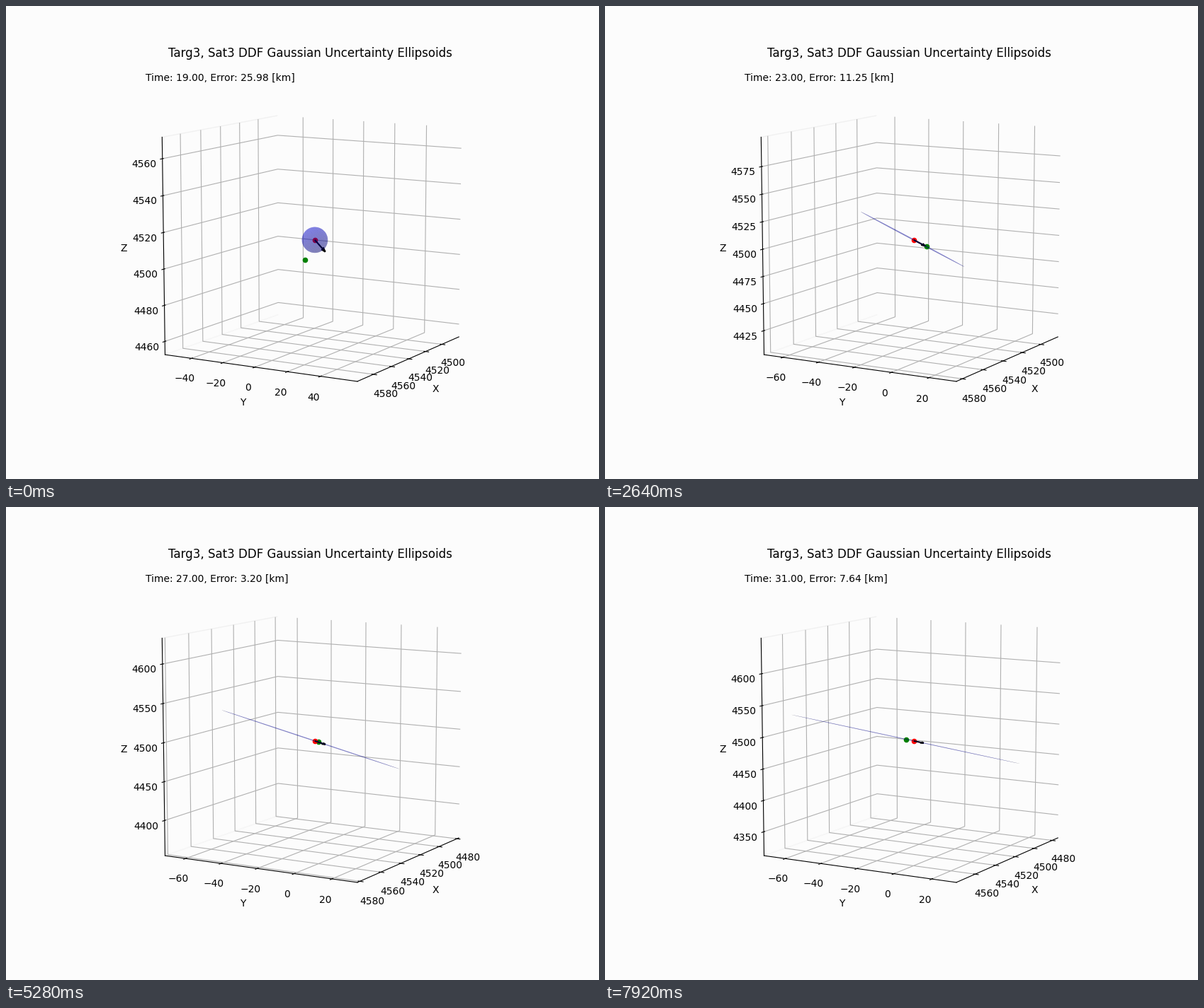
These frames come from a looping animation (837 by 669 pixels, 8 s). A matplotlib script:

```python
import numpy as np
import matplotlib.pyplot as plt
from matplotlib.animation import FuncAnimation
from matplotlib.ticker import FixedLocator, MaxNLocator

BG = "#fcfcfc"
STEP_MS, TICK_MS, LOOP_MS = 330, 80, 8000

# Estimator history: (step, value) knots, linear in between
KNOTS = [0, 1, 5, 8, 12, 16, 21, 24]
CENTRE_Y = [2.24, -18.4, -19.05, -18.4, -19.2, -19.3, -18.6, -19.7]
CENTRE_Z = [4512.1, 4509.4, 4505.9, 4502.1, 4498.4, 4493.4, 4488.0, 4483.5]
X_KNOTS = [0, 1, 5, 8, 12, 14, 15, 16, 17, 18, 19, 20, 21, 22, 24]
CENTRE_X = [4537.9, 4533.7, 4532.1, 4533.2, 4531.8, 4531.2, 4529.6, 4530.1,
            4529.0, 4529.0, 4528.2, 4528.1, 4526.9, 4526.9, 4525.7]
MAJOR = [7.1, 11.8, 30.4, 45.4, 64.8, 83.6, 104.4, 115.0]
MINOR_X = [7.1, 0.5, 0.3, 0.25, 0.2, 0.2, 0.15, 0.1]
MINOR_Y = [7.1, 0.8, 0.45, 0.42, 0.4, 0.4, 0.38, 0.36]
DIR_X = [0.61, 0.615, 0.635, 0.653, 0.677, 0.692, 0.718, 0.73]
DIR_Y = [-0.31, -0.305, -0.29, -0.26, -0.221, -0.193, -0.147, -0.128]
MISS = [16.9, 16.9, 13.72, 11.25, 7.94, 3.20, -3.78, -7.64]

# the small excess keeps the pixel size from rounding down
fig = plt.figure(figsize=(8.3701, 6.6901), dpi=100, facecolor=BG)
ax = fig.add_subplot(projection="3d", facecolor=BG)
ax.set_box_aspect((1, 1, 1))
ax.view_init(elev=10, azim=30)
ax.set_title("Targ3, Sat3 DDF Gaussian Uncertainty Ellipsoids")
ax.set_xlabel("X")
ax.set_ylabel("Y")
ax.set_zlabel("Z")
for axis in (ax.xaxis, ax.yaxis, ax.zaxis):
    axis.pane.set_fill(False)
for axis in (ax.xaxis, ax.zaxis):
    axis.pane.set_edgecolor(BG)
note = ax.text2D(0.05, 0.95, "", transform=ax.transAxes)

theta, phi = np.meshgrid(np.linspace(0, 2 * np.pi, 33),
                         np.linspace(0, np.pi, 33), indexing="ij")
SPHERE = np.array([np.cos(theta) * np.sin(phi),
                   np.sin(theta) * np.sin(phi),
                   np.cos(phi)])
drawn = []


def state(k):
    """Centre, radii, major direction and truth position at step k."""
    def at(values):
        return np.interp(k, KNOTS, values)

    centre = np.array([np.interp(k, X_KNOTS, CENTRE_X), at(CENTRE_Y), at(CENTRE_Z)])
    radii = np.array([at(MINOR_X), at(MINOR_Y), at(MAJOR)])
    nx, ny = at(DIR_X), at(DIR_Y)
    n = np.array([nx, ny, np.sqrt(1 - nx**2 - ny**2)])
    # the filter starts 15 km off along every axis
    offset = np.full(3, -15.0) if k == 0 else -at(MISS) * n
    return centre, radii, n, centre + offset


def ellipsoid(centre, radii, n):
    side = np.cross(n, [0, 0, 1])
    side /= np.linalg.norm(side)
    basis = np.column_stack([side, np.cross(n, side), n]) * radii
    return np.tensordot(basis, SPHERE, 1) + centre[:, None, None]


def set_range(axis, set_lim, mid, half):
    """Ticks stay inside mid +- half; the drawn box is slightly larger."""
    locs = MaxNLocator(9, steps=[1, 2, 2.5, 5, 10]).tick_values(mid - half, mid + half)
    axis.set_major_locator(FixedLocator(locs[np.abs(locs - mid) <= half]))
    pad = half * 25 / 24
    set_lim(mid - pad, mid + pad)


def update(i):
    k = (TICK_MS * (i + 1) - 1) // STEP_MS
    centre, radii, n, truth = state(k)
    while drawn:
        drawn.pop().remove()
    drawn.append(ax.scatter(*centre[:, None], color="r"))
    drawn.append(ax.scatter(*truth[:, None], color="g"))
    drawn.append(ax.quiver(*centre, *(-10 * n), color="k"))
    drawn.append(ax.plot_surface(*ellipsoid(centre, radii, n), color="b", alpha=0.3))
    limits = (ax.set_xlim3d, ax.set_ylim3d, ax.set_zlim3d)
    for axis, set_lim, mid, r in zip((ax.xaxis, ax.yaxis, ax.zaxis), limits, centre, radii):
        set_range(axis, set_lim, mid, 50 + r)
    error = np.linalg.norm(truth - centre)
    note.set_text(f"Time: {19 + k / 2:.2f}, Error: {error:.2f} [km]")
    return list(drawn)


anim = FuncAnimation(fig, update, frames=LOOP_MS // TICK_MS, interval=TICK_MS,
                     init_func=lambda: update(0), repeat=True, repeat_delay=0)
plt.show()
```
